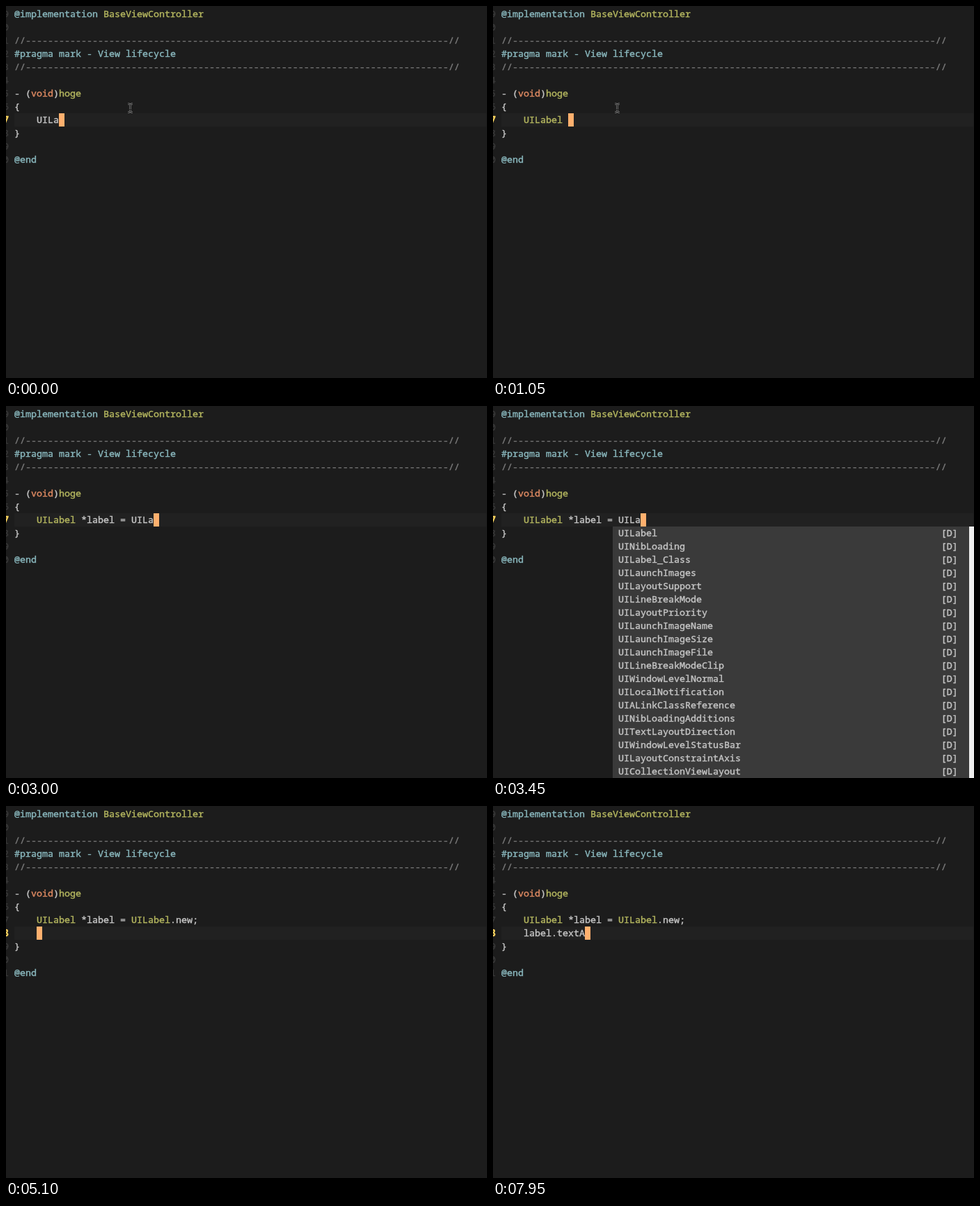
An HTML page that plays this animation: 691x534 px, repeating every 8 s.

```html
<!DOCTYPE html>
<html lang="en">
<head>
<meta charset="utf-8">
<title>Code completion</title>
<style>
html, body { margin: 0; width: 100%; height: 100%; overflow: hidden; background: #1c1c1c; }
#stage {
  position: relative; width: 691px; height: 534px; overflow: hidden;
  background: #1c1c1c; color: #c6c6c6;
  font: 500 13.3333px/19px "Noto Sans Mono", "DejaVu Sans Mono", monospace;
  font-kerning: none; font-variant-ligatures: none;
  -webkit-text-stroke: 0.4px;
}
#stage > * { position: absolute; }
.row, .item { height: 19px; white-space: pre; }
.row { left: 12px; }
.num { left: -4px; color: #3a3a3a; }
.num.on { color: #ffd75f; font-weight: 700; }
.pre { color: #8ab8be; }
.cls { color: #b4b65f; }
.typ { color: #de8a62; }
.com { color: #7a7a7a; }
#line { left: 12px; width: 678px; height: 19px; background: #212121; }
#cursor { width: 8px; height: 19px; background: #ffb06e; }
#menu { top: 173px; width: 512px; height: 361px; background: #3a3a3a; border-right: 8px solid #eee; }
.item { padding-left: 8px; }
.item.on { background: #bcbcbc; color: #3a3a3a; }
#beam { left: 172px; top: 138px; }
</style>
</head>
<body>
<div id="stage">
  <div id="line"></div>
  <div id="text" style="left:0;top:2px"></div>
  <div id="cursor"></div>
  <svg id="beam" width="14" height="17" fill="none">
    <defs><path id="bar" d="M3 2.5H5L6.5 4L8 2.5H10M6.5 4V13M3 14.5H5L6.5 13L8 14.5H10M5 10.5H8"/></defs>
    <use href="#bar" stroke="#777" stroke-width="2.6"/>
    <use href="#bar" stroke="#1c1c1c"/>
  </svg>
  <div id="menu"></div>
</div>
<script>
const LOOP = 8000, CELL = 8, ROW = 19, LEFT = 12, TOP = 2, FIRST = 8;
const $ = id => document.getElementById(id);
const span = (cls, s) => `<span class="${cls}">${s}</span>`;

const rule = span('com', '//' + '-'.repeat(76) + '//');
const head = [
  span('pre', '@implementation') + ' ' + span('cls', 'BaseViewController'),
  '', rule, span('pre', '#pragma mark - View lifecycle'), rule, '',
  '- (' + span('typ', 'void') + ')' + span('cls', 'hoge'),
  '{'
];
const tail = ['}', '', span('pre', '@end')];

const names = `UILabel UINibLoading UILabel_Class UILaunchImages UILayoutSupport
UILineBreakMode UILayoutPriority UILaunchImageName UILaunchImageSize UILaunchImageFile
UILineBreakModeClip UIWindowLevelNormal UILocalNotification UIALinkClassReference
UINibLoadingAdditions UITextLayoutDirection UIWindowLevelStatusBar
UILayoutConstraintAxis UICollectionViewLayout`.split(/\s+/);
$('menu').innerHTML = names.map(n => `<div class="item">${n.padEnd(58)}[D]</div>`).join('');

// Each step: start time, typed text, menu column (0 = closed), first entry chosen
const steps = [];
const add = (t, text, menu = 0, chosen = false) => steps.push({ t, text, menu, chosen });
const type = (t, base, parts) => parts.forEach((p, i) => add(t + i * 150, base + p));

const decl = 'UILabel *label = ';
const done = decl + 'UILabel.new;\n';
add(0, 'UILa');
add(150, 'UILa', 3);
add(750, 'UILabel', 3, true);
add(1050, 'UILabel ');
type(1350, 'UILabel ', ['*', '*la', '*lab', '*label', '*label ', '*label =', '*label = ']);
type(2550, decl, ['U', 'UI', 'UIL', 'UILa']);
add(3450, decl + 'UILa', 20);
add(3900, decl + 'UILabel', 20, true);
type(4050, decl + 'UILabel.', ['', 'ne', 'new']);
add(4650, done.trimEnd());
add(5100, done);
type(5550, done, ['l', 'la', 'lab', 'label', 'label.']);
type(6450, done + 'label.', ['t', 'te', 'tex', 'text']);
add(7200, done + 'label.textAl');
add(7950, done + 'label.textA');

function draw({ t, text, menu, chosen }) {
  const typed = text.split('\n').map(s => '    ' + s);
  const now = FIRST + typed.length - 1;
  const y = TOP + now * ROW;
  const rows = [...head, ...typed.map(s => s.replace(/UILabel/g, span('cls', '$&'))), ...tail];
  $('text').innerHTML = rows.map((s, i) => {
    const pos = `style="position:absolute;top:${i * ROW}px"`;
    return `<div class="row num${i === now ? ' on' : ''}" ${pos}>${(i + 9) % 10}</div>` +
           `<div class="row" ${pos}>${s}</div>`;
  }).join('');
  $('line').style.top = $('cursor').style.top = y + 'px';
  $('cursor').style.left = LEFT + typed[typed.length - 1].length * CELL + 'px';
  $('menu').style.display = menu ? 'block' : 'none';
  $('menu').style.left = LEFT + menu * CELL + 'px';
  $('menu').firstChild.classList.toggle('on', chosen);
  $('beam').style.display = t < 1350 ? 'block' : 'none';
}

const start = performance.now();
let shown;
function tick() {
  const t = (performance.now() - start) % LOOP;
  const step = steps.findLast(s => s.t <= t);
  if (step !== shown) draw(shown = step);
  requestAnimationFrame(tick);
}
tick();
</script>
</body>
</html>
```
